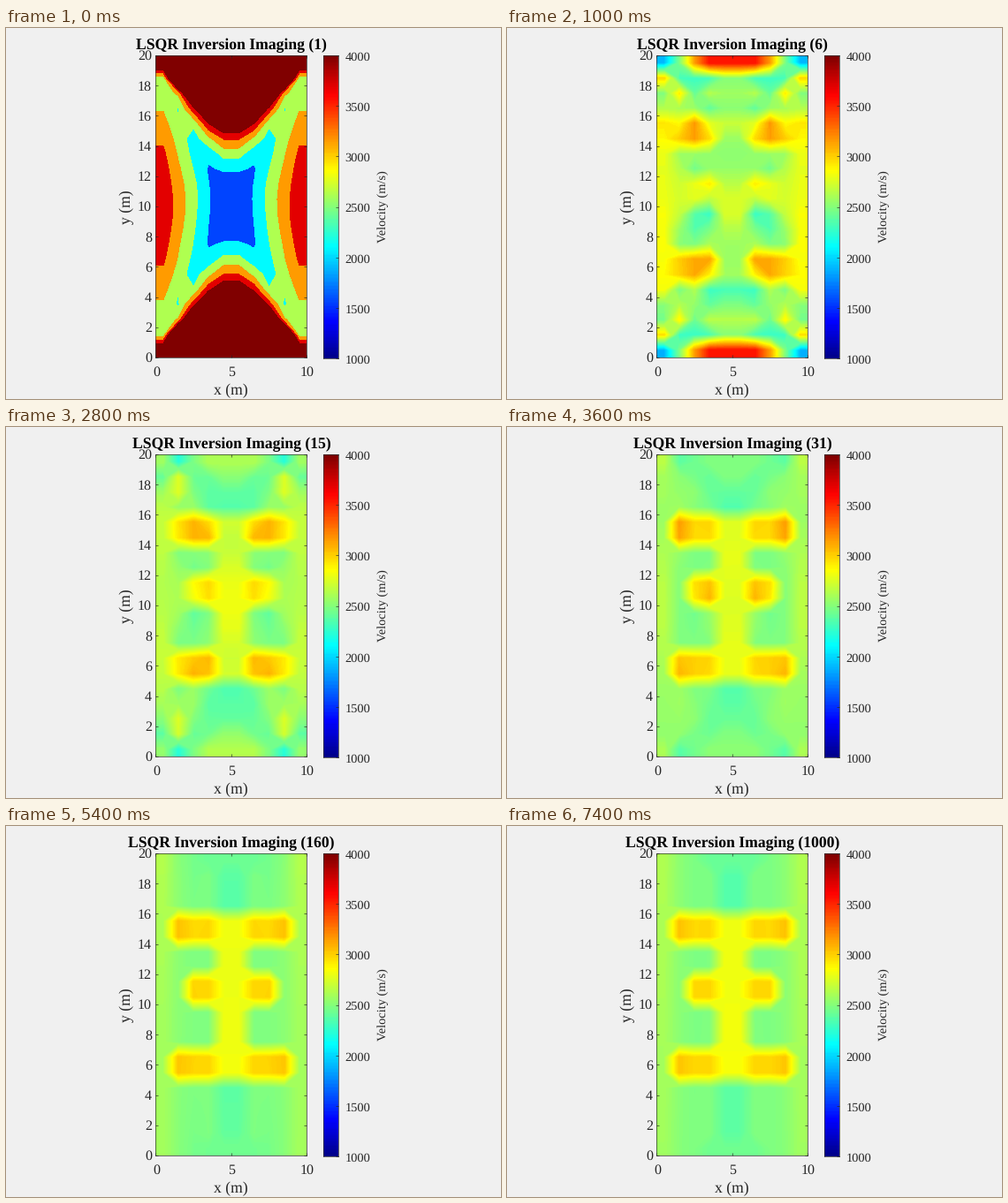
A matplotlib script for the animation above (7600 ms loop, 560 by 420 pixels).

```python
import numpy as np
import matplotlib.pyplot as plt
from matplotlib.animation import FuncAnimation
from matplotlib.colors import ListedColormap, Normalize

W, H, DPI = 560, 420, 80
PX = 72 / DPI                       # points per pixel
NX, NY = 10, 20                     # model cells of 1 m
STEPS, LAST = 38, 277               # solution no longer changes after LAST
INK = (0.15, 0.15, 0.15)
plt.rcParams.update({"font.family": "Liberation Serif", "text.hinting": "none"})


# ---- cross-well tomography with straight rays ----
def true_slowness():
    v = np.full((NY, NX), 2500.0)
    for y0, y1, x0, x1 in ((5, 7, 1, 9), (10, 12, 2, 8),
                           (14, 16, 1, 9), (5, 16, 4, 6)):
        v[y0:y1, x0:x1] = 3000
    return 1 / v.ravel()


def ray_row(i, j):
    """Path length in every cell from source i (left) to receiver j (right)."""
    y0, dy = i + 0.5, j - i
    t = np.arange(NX + 1) / NX
    if dy:
        t = np.concatenate([t, (np.arange(1, NY) - y0) / dy])
    t = np.sort(t[(t >= 0) & (t <= 1)])
    mid = (t[1:] + t[:-1]) / 2
    cell = np.floor(y0 + dy * mid) * NX + np.floor(NX * mid)
    row = np.zeros(NX * NY)
    np.add.at(row, cell.astype(int), np.diff(t) * np.hypot(NX, dy))
    return row


def lsqr(A, b, count):
    """Yield the solution after each iteration."""
    norm = np.linalg.norm
    phibar = norm(b)
    u = b / phibar
    v = A.T @ u
    alpha = rhobar = norm(v)
    v = v / alpha
    w, x = v, np.zeros(A.shape[1])
    for _ in range(count):
        u = A @ v - alpha * u
        beta = norm(u)
        u = u / beta
        v = A.T @ u - beta * v
        alpha = norm(v)
        v = v / alpha
        rho = np.hypot(rhobar, beta)
        c, s = rhobar / rho, beta / rho
        x = x + c * phibar / rho * w
        w = v - s * alpha / rho * w
        rhobar, phibar = -c * alpha, s * phibar
        yield x


def iteration(k):
    """Iteration number shown at step k: one by one, then geometric."""
    return k + 1 if k < 15 else round(1000 * 6.25 ** ((k - 37) / 10))


A = np.array([ray_row(i, j) for i in range(NY) for j in range(NY)])
fields = [np.pad(1 / x.reshape(NY, NX), 1, mode="edge")
          for x in lsqr(A, A @ true_slowness(), LAST)]
gx = np.concatenate([[0], np.arange(NX) + 0.5, [NX]])
gy = np.concatenate([[0], np.arange(NY) + 0.5, [NY]])

# ---- colours ----
ramp = np.arange(1, 257) / 256
jet = ListedColormap(np.transpose(
    [np.clip(1.5 - np.abs(4 * ramp - c), 0, 1) for c in (3, 2, 1)]))
norm = Normalize(1000, 4000)

# ---- stage ----
fig = plt.figure(figsize=(W / DPI, H / DPI), dpi=DPI, facecolor=(240 / 255,) * 3)


def panel(x0, y0, x1, y1):
    ax = fig.add_axes([x0 / W, 1 - y1 / H, (x1 - x0) / W, (y1 - y0) / H])
    line = PX * 2 / 3
    for s in ax.spines.values():
        s.set(linewidth=line, color=INK)
    ax.tick_params(direction="in", length=3.4 * PX, width=line, color=INK,
                   labelbottom=False, labelleft=False)
    return ax


def label(x, y, s, size, ha="center", color=INK, **kw):
    return fig.text(x / W, 1 - y / H, s, fontsize=size * PX, ha=ha,
                    va="baseline", color=color, rotation_mode="anchor", **kw)


L, T, R, B = 169.4, 31, 340.4, 373
ax = panel(L, T, R, B)
ax.set(xlim=(0, NX), ylim=(0, NY), xticks=[0, 5, 10], yticks=range(0, 21, 2))
ax.tick_params(top=True, right=True)
for v in (0, 5, 10):
    label(L + (R - L) * v / NX + 0.5, 394, str(v), 16)
for v in range(0, 21, 2):
    label(165, B - (B - T) * v / NY + 5.2, str(v), 16, ha="right")
label(254.5, 415.5, "x (m)", 17.6)
label(141.5, 202.5, "y (m)", 17.6, rotation=90)

BOT = 374
bar = panel(359.4, T, 376.4, BOT)
bar.imshow(ramp[:, None], cmap=jet, vmin=0, vmax=1, origin="lower",
           extent=(0, 1, 1000, 4000), aspect="auto", interpolation="nearest")
bar.set(xticks=[], yticks=range(1000, 4001, 500))
bar.tick_params(left=False, right=True)
for v in range(1000, 4001, 500):
    label(383.5, BOT - (BOT - T) * (v - 1000) / 3000 + 5.8, str(v), 14.4, ha="left")
label(430, 202, "Velocity (m/s)", 14.4, rotation=90)

title = label(255, 24, "", 17.6, color="black", fontweight="bold")


def update(k):
    n = iteration(k)
    z = fields[min(n, LAST) - 1]
    for c in list(ax.collections):
        c.remove()
    levels = np.linspace(z.min(), z.max(), 102)
    ax.contourf(gx, gy, z, levels=levels, colors=jet(norm(levels[:-1])))
    title.set_text(f"LSQR Inversion Imaging ({n})")
    return []


anim = FuncAnimation(fig, update, frames=STEPS, interval=200, repeat=True,
                     init_func=lambda: update(0), blit=False)
plt.show()
```
